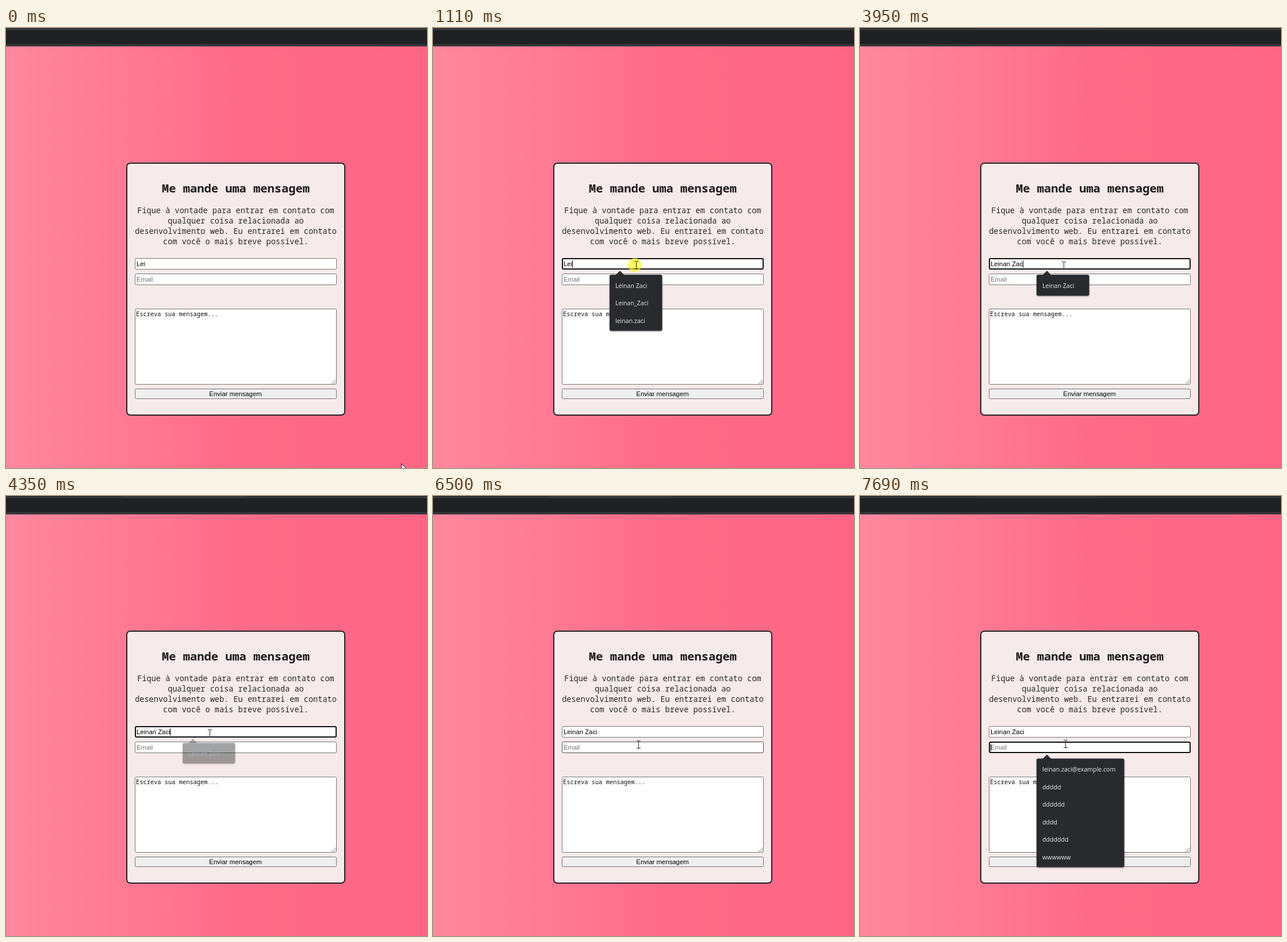
Write an HTML page with a canvas that moves like this. It is 732 by 765 pixels and loops after 8 s.

```html
<!DOCTYPE html>
<html lang="pt-BR">
<head>
<meta charset="utf-8">
<title>Me mande uma mensagem</title>
<style>
  html, body { margin: 0; width: 100%; height: 100%; overflow: hidden; background: #ff6a88; }
  canvas { display: block; }
</style>
</head>
<body>
<canvas id="stage" width="732" height="765"></canvas>
<script>
const ctx = document.getElementById('stage').getContext('2d');
const LOOP = 8000;
const BLINK = 530;

const MONO = '"Noto Sans Mono", "DejaVu Sans Mono", monospace';
const FORM = '11.33px "Liberation Sans", Arial, sans-serif';
const MENU = '10.6px "Open Sans", "Noto Sans", sans-serif';

const NAME = 'Leinan Zaci';
const NAME_OPTIONS = [NAME, 'Leinan_Zaci', 'leinan.zaci'];
const EMAIL_OPTIONS = ['leinan.zaci@example.com', 'ddddd', 'dddddd', 'dddd', 'ddddddd', 'wwwwww'];
const INTRO = [
  'Fique à vontade para entrar em contato com',
  'qualquer coisa relacionada ao',
  'desenvolvimento web. Eu entrarei em contato',
  'com você o mais breve possível.'
];

const nameBox = { x: 224, y: 400, w: 351, h: 20 };
const emailBox = { x: 224, y: 427, w: 351, h: 20 };
const messageBox = { x: 224, y: 488, w: 351, h: 132 };
const button = { x: 224, y: 627, w: 351, h: 18 };
const headingArea = { x: 271, y: 265, w: 257, h: 27 };
const introArea = { x: 224, y: 308, w: 351, h: 72 };
const textAreas = [nameBox, emailBox, messageBox, headingArea, introArea];

const NAME_FOCUS = 1110, SPACE_TYPED = 2990, NAME_DONE = 4210;
const NAME_BLUR = 6290, EMAIL_FOCUS = 6630;
const keyTimes = [2260, 2600, 2790, SPACE_TYPED, 3550, 3750, 3950, NAME_DONE];
const clicks = [[NAME_FOCUS, 1250], [NAME_BLUR, 6400], [EMAIL_FOCUS, 6770]];

// Pointer path: start, end, number of steps, destination
const startPoint = [687, 757];
const moves = [
  [70, 840, 13, 353, 413],
  [910, 910, 1, 353, 412],
  [1390, 1390, 1, 354, 413],
  [5300, 5500, 4, 334, 327],
  [5770, 6090, 6, 357, 449],
  [6360, 6500, 3, 357, 432],
  [6960, 6960, 1, 357, 431]
];

function pointerAt(t) {
  let [x, y] = startPoint;
  for (const [start, end, steps, toX, toY] of moves) {
    if (t < start) break;
    const done = t >= end ? steps : 1 + Math.floor((t - start) / (end - start) * (steps - 1));
    const p = (1 - Math.cos(Math.PI * done / steps)) / 2;
    x += (toX - x) * p;
    y += (toY - y) * p;
  }
  return { x: Math.round(x), y: Math.round(y) };
}

const inside = (p, b) => p.x >= b.x && p.x < b.x + b.w && p.y >= b.y && p.y < b.y + b.h;

function rect(x, y, w, h, color) {
  ctx.fillStyle = color;
  ctx.fillRect(x, y, w, h);
}

function text(str, x, y, font, color, align = 'left') {
  ctx.font = font;
  ctx.fillStyle = color;
  ctx.textAlign = align;
  ctx.fillText(str, x, y);
}

function frame({ x, y, w, h }, fill, stroke, line, radius) {
  ctx.beginPath();
  ctx.roundRect(x + line / 2, y + line / 2, w - line, h - line, radius);
  ctx.fillStyle = fill;
  ctx.fill();
  ctx.strokeStyle = stroke;
  ctx.lineWidth = line;
  ctx.stroke();
}

function polygon(points) {
  ctx.beginPath();
  points.forEach(([x, y]) => ctx.lineTo(x, y));
  ctx.closePath();
}

function drawPage(t) {
  const pink = ctx.createLinearGradient(0, 0, 732, 0);
  pink.addColorStop(0, '#ff889e');
  pink.addColorStop(0.56, '#ff6b88');
  pink.addColorStop(1, '#ff6685');
  rect(0, 0, 732, 765, pink);

  rect(0, 0, 732, 32, '#35363a');
  rect(0, 4, 732, 24, '#202124');
  if (t >= 1180) {
    rect(0, 0, 203, 1, '#292a2d');
    rect(414, 0, 318, 1, '#292a2d');
  }

  frame({ x: 209, y: 234, w: 381, h: 440 }, '#f7eaea', '#222222', 2, 6);
  text('Me mande uma mensagem', 399.5, 286, '600 20.4px ' + MONO, '#1c1a1b', 'center');
  INTRO.forEach((line, i) =>
    text(line, 399.5, 322 + i * 17.9, '13.6px ' + MONO, '#2a2627', 'center'));
}

function drawField(box, focused, hovered) {
  if (focused) frame(box, '#ffffff', '#101010', 2, 2);
  else frame(box, '#ffffff', hovered ? '#4f4f4f' : '#767676', 1, 2);
}

function drawCaret(x, y, elapsed) {
  if (Math.floor(elapsed / BLINK) % 2 === 0) rect(Math.round(x), y, 1, 13, '#000000');
}

function drawForm(t, pointer) {
  const nameFocused = t >= NAME_FOCUS && t < NAME_BLUR;
  const emailFocused = t >= EMAIL_FOCUS;
  const pressed = keyTimes.filter(k => k <= t);
  const typed = NAME.slice(0, 3 + pressed.length);

  drawField(nameBox, nameFocused, inside(pointer, nameBox));
  text(typed, 227, 414, FORM, '#000000');
  if (nameFocused) {
    drawCaret(226.6 + ctx.measureText(typed).width, 404, t - (pressed.pop() || NAME_FOCUS));
  }

  drawField(emailBox, emailFocused, inside(pointer, emailBox));
  text('Email', 227, 441, FORM, '#757575');
  if (emailFocused) drawCaret(227, 431, t - EMAIL_FOCUS);

  drawField(messageBox, false, inside(pointer, messageBox));
  text('Escreva sua mensagem...', 226, 501, '10.38px ' + MONO, '#111111');
  ctx.strokeStyle = '#777777';
  ctx.lineWidth = 1;
  ctx.beginPath();
  for (const size of [7, 3]) {
    ctx.moveTo(573.5 - size, 618.5);
    ctx.lineTo(573.5, 618.5 - size);
  }
  ctx.stroke();

  frame(button, inside(pointer, button) ? '#e5e5e5' : '#efefef', '#767676', 1, 2);
  text('Enviar mensagem', 399, 640, FORM, '#000000', 'center');
}

function drawMenu(options, y, w, alpha = 1) {
  const h = options.length * 30.5 + 6;
  ctx.save();
  ctx.globalAlpha = alpha;
  ctx.shadowColor = 'rgba(0,0,0,.4)';
  ctx.shadowBlur = 3;
  ctx.shadowOffsetY = 1;
  ctx.fillStyle = '#292a2d';
  ctx.beginPath();
  ctx.roundRect(307, y, w, h, 3);
  ctx.fill();
  ctx.shadowColor = 'transparent';
  polygon([[317.5, y + 0.5], [325, y - 7], [332.5, y + 0.5]]);
  ctx.fill();
  options.forEach((option, i) => text(option, 317, y + 22.5 + i * 30.5, MENU, '#e8eaed'));
  ctx.restore();
}

function drawMenus(t) {
  if (t >= NAME_FOCUS && t < 4420) {
    const options = t < SPACE_TYPED ? NAME_OPTIONS : [NAME];
    const alpha = t < NAME_DONE ? 1 : 1 - (t - NAME_DONE) / 210;
    drawMenu(options, 429, 91.5, alpha);
  }
  if (t >= EMAIL_FOCUS) drawMenu(EMAIL_OPTIONS, 456.5, 152.5);
}

function drawPointer(t, { x, y }) {
  if (clicks.some(([from, to]) => t >= from && t < to)) {
    ctx.fillStyle = 'rgba(255,255,0,.6)';
    ctx.beginPath();
    ctx.arc(x - 2, y, 12, 0, Math.PI * 2);
    ctx.fill();
  }
  ctx.save();
  ctx.translate(x, y);
  if (textAreas.some(area => inside({ x, y }, area))) {
    rect(0, -6, 1, 13, '#222222');
    for (const edge of [-7, 6]) {
      rect(-3, edge, 3, 1, '#222222');
      rect(1, edge, 3, 1, '#222222');
    }
  } else {
    polygon([[0.5, 0.5], [0.5, 14], [3.6, 11.2], [5.8, 16], [8, 15], [5.9, 10.4], [10, 10]]);
    ctx.fillStyle = '#ffffff';
    ctx.fill();
    ctx.strokeStyle = '#111111';
    ctx.lineWidth = 1;
    ctx.stroke();
  }
  ctx.restore();
}

function draw(now) {
  const t = now % LOOP;
  const pointer = pointerAt(t);
  drawPage(t);
  drawForm(t, pointer);
  drawMenus(t);
  drawPointer(t, pointer);
}

let origin = null;
function tick(now) {
  if (origin === null) origin = now;
  draw(Math.max(0, now - origin));
  requestAnimationFrame(tick);
}
draw(0);
requestAnimationFrame(tick);
</script>
</body>
</html>
```
